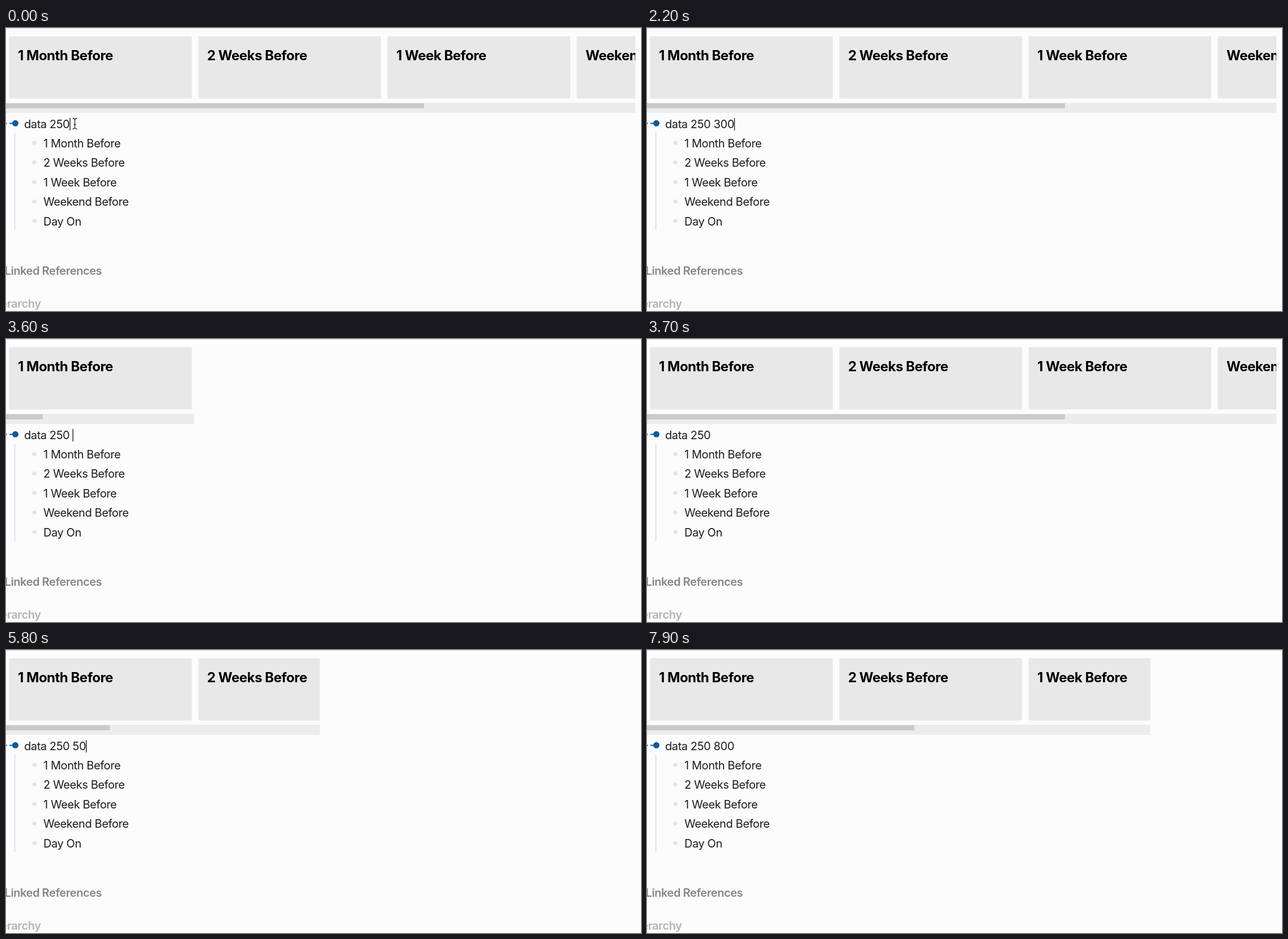
An HTML page that plays this animation: 1121 px wide and 500 px high, repeating every 8 s.

```html
<!DOCTYPE html>
<html lang="en">
<head>
<meta charset="utf-8">
<title>Resizing board</title>
<style>
  html, body { margin: 0; width: 100%; height: 100%; overflow: hidden; background: #fcfcfc; }
  svg { display: block; width: 1121px; height: 500px; }
  text {
    font: 400 20px Inter, sans-serif;
    font-optical-sizing: none;
    letter-spacing: -0.021em;
    white-space: pre;
    fill: #1c1c1c;
  }
  .title { font-size: 24px; font-weight: 700; fill: #000; }
  .heading { font-weight: 600; fill: #868686; }
  .faint { font-weight: 600; fill: #b3b3b3; text-anchor: end; }
</style>
</head>
<body>
<svg viewBox="0 0 1121 500">
  <rect width="1121" height="500" fill="#fcfcfc"/>
  <rect width="1121" height="1" fill="#d8d8dc"/>
  <clipPath id="clip"><rect id="view" height="130"/></clipPath>
  <g id="cards" clip-path="url(#clip)"></g>
  <rect id="track" y="132" height="18" fill="#ececec"/>
  <rect id="thumb" y="133" height="9" fill="#cacaca"/>
  <path d="M0 168.5h1.5M6 168.5h8" stroke="#0d5a9b" stroke-width="2"/>
  <circle cx="16.5" cy="168.3" r="5.5" fill="#0d5a9b"/>
  <rect x="14.5" y="185" width="2" height="172" fill="#e1e1ea"/>
  <text id="entry" x="32" y="177"></text>
  <rect id="caret" y="159" width="1.3" height="22" fill="#111"/>
  <path id="pointer" d="M117.5 159.5q3 0 4 2q1-2 4-2M121.5 161v16M119.5 170.5h4M117.5 178.5q3 0 4-2q1 2 4 2" fill="none" stroke="#222" stroke-width="1.3"/>
  <g id="list"></g>
  <text class="heading" x="-2.5" y="435.5">Linked References</text>
  <text class="faint" x="61.5" y="493.5">Hierarchy</text>
</svg>
<script>
const LOOP = 8000, BLINK = 500;
const names = ['1 Month Before', '2 Weeks Before', '1 Week Before', 'Weekend Before', 'Day On'];

// [time, text after the key press]
const keys = [
  [0, ''], [500, ' '],
  [1800, ' 3'], [2000, ' 30'], [2100, ' 300'],
  [2900, ' 30'], [3050, ' 3'], [3200, ' '],
  [4000, ' 5'], [4100, ' 50'], [4200, ' 500'],
  [5800, ' 50'], [6000, ' 5'], [6200, ' '],
  [6600, ' 8'], [6800, ' 80'], [6950, ' 800']
];

// [time, board right edge, scroll thumb right edge]
const sizes = [
  [0, 1111, 738], [2600, 332, 65], [3700, 1111, 738], [4700, 554, 183], [7400, 888.5, 472]
];

const $ = id => document.getElementById(id);
const [view, track, thumb, entry, caret, pointer] =
  ['view', 'track', 'thumb', 'entry', 'caret', 'pointer'].map($);

$('cards').innerHTML = names.slice(0, 4).map((name, i) => {
  const x = 5.5 + 334 * i;
  return `<rect x="${x}" y="14.5" width="322.5" height="110" rx="2" fill="#e8e8e8"/>
    <text class="title" x="${x + 15.5}" y="57">${name}</text>`;
}).join('');

$('list').innerHTML = names.map((name, i) => {
  const y = 203 + 34.5 * i;
  return `<circle cx="50" cy="${y}" r="3.6" fill="#e0e3e9"/>
    <text x="66" y="${y + 7.5}">${name}</text>`;
}).join('');

const current = (steps, t) => steps.findLast(step => step[0] <= t);

function draw(t) {
  const [pressed, suffix] = current(keys, t);
  const [, edge, thumbEdge] = current(sizes, t);
  view.setAttribute('width', edge);
  track.setAttribute('width', edge);
  thumb.setAttribute('width', thumbEdge);

  const value = 'data 250' + suffix;
  if (entry.textContent !== value) entry.textContent = value;
  caret.setAttribute('x', 32 + entry.getComputedTextLength());
  caret.style.opacity = (t - pressed) % (2 * BLINK) < BLINK ? 1 : 0;
  pointer.style.opacity = t < 500 ? 1 : 0;
}

const start = performance.now();
function tick() {
  draw((performance.now() - start + 10) % LOOP);
  requestAnimationFrame(tick);
}
tick();
</script>
</body>
</html>
```
